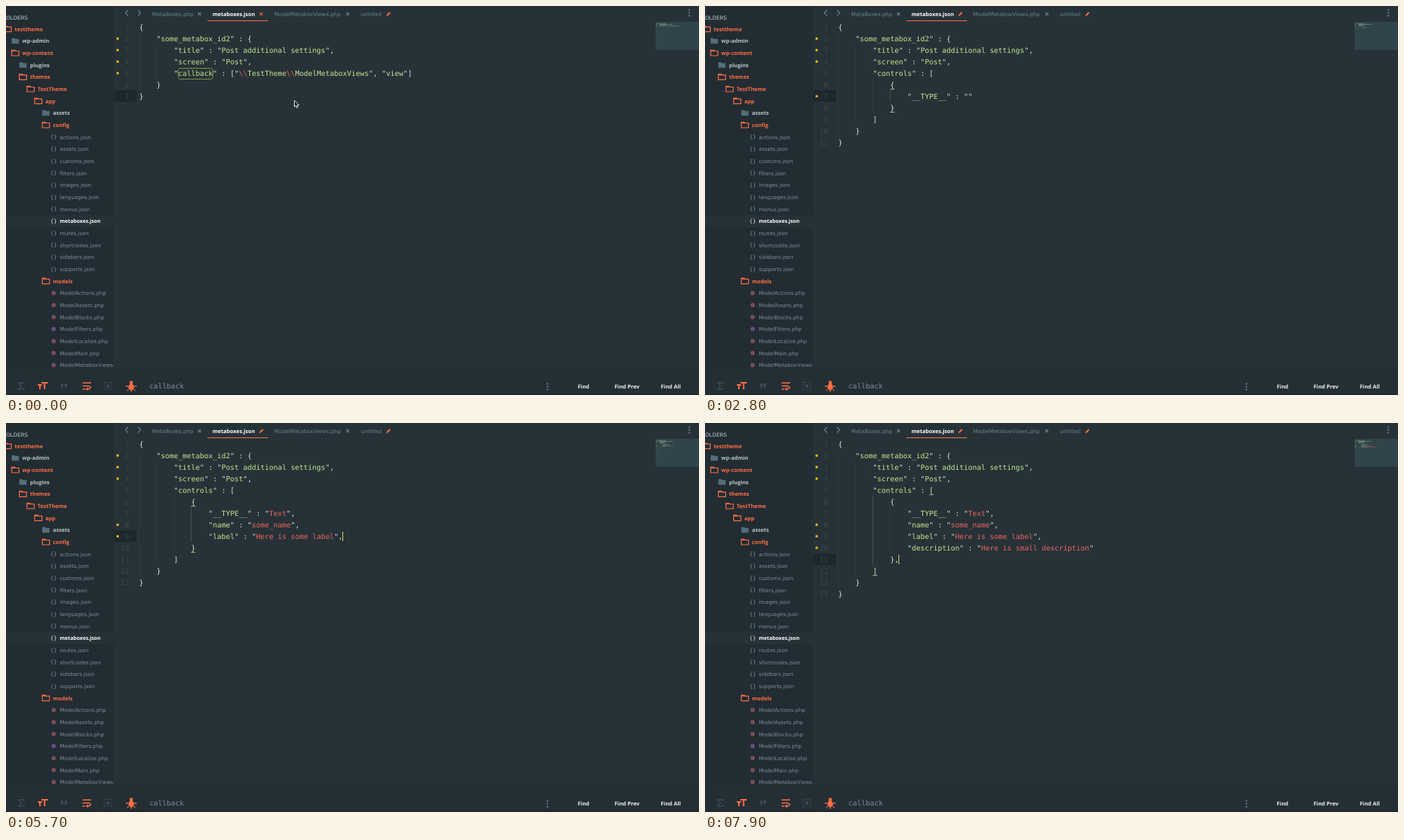
These frames come from a looping animation (960 px wide and 540 px high, 8000 ms). An HTML page with a canvas:

```html
<!DOCTYPE html>
<html lang="en">
<head>
<meta charset="utf-8">
<title>Code editor</title>
<style>
html, body { margin: 0; width: 100%; height: 100%; overflow: hidden; background: #263238; }
canvas { display: block; width: 960px; height: 540px; }
</style>
</head>
<body>
<canvas id="stage" width="960" height="540"></canvas>
<script>
const ctx = document.getElementById('stage').getContext('2d');
ctx.textRendering = 'geometricPrecision';
const LOOP = 8000, X0 = 184.5, CHAR = 6, ROW = 16;
const MONO = '9.967px "DejaVu Sans Mono", monospace';
const UI = '7.25px "DejaVu Sans", sans-serif';
const TAB = '7.45px "DejaVu Sans", sans-serif';
const BOLD = 'bold 7.5px "Open Sans", sans-serif';
const BOLD_FILE = 'bold 7.2px "Open Sans", sans-serif';
const C = {
  bg: '#263238', side: '#222c33', dark: '#1d272d', orange: '#ff6e43', grey: '#688490', file: '#78909c',
  dim: '#37464d', green: '#c3e88d', red: '#ee655a', pale: '#d6e4d6', yellow: '#ffc414'
};

// ---- drawing helpers ----
function rect(x, y, w, h, color) {
  ctx.fillStyle = color;
  ctx.fillRect(x, y, w, h);
}
function text(s, x, y, font, color, align = 'left') {
  ctx.font = font;
  ctx.fillStyle = color;
  ctx.textAlign = align;
  ctx.fillText(s, x, y);
}
function dot(x, y, r, color) {
  ctx.fillStyle = color;
  ctx.beginPath();
  ctx.arc(x, y, r, 0, 7);
  ctx.fill();
}
function line(points, color, width = 1) {
  ctx.strokeStyle = color;
  ctx.lineWidth = width;
  ctx.beginPath();
  points.forEach(([x, y], i) => i ? ctx.lineTo(x, y) : ctx.moveTo(x, y));
  ctx.stroke();
}
function cross(x, y, color) {
  line([[x - 2, y - 2], [x + 2, y + 2]], color, 1.1);
  line([[x - 2, y + 2], [x + 2, y - 2]], color, 1.1);
}
function pencil(x, y) {
  line([[x - 2, y + 2], [x + 2, y - 2]], C.orange, 2.2);
  line([[x - 3.2, y + 3.2], [x - 2, y + 2]], C.orange, 1);
}
const colX = c => X0 + c * CHAR;
const indentOf = s => s.search(/\S|$/);

// ---- a tiny editor with auto-pairing ----
const START = [
  '{',
  '    "some_metabox_id2" : {',
  '        "title" : "Post additional settings",',
  '        "screen" : "Post",',
  String.raw`        "callback" : ["\\TestTheme\\ModelMetaboxViews", "view"]`,
  '    }',
  '}'
];
const PAIRS = { '"': '"', '[': ']', '{': '}' };

class Doc {
  constructor() {
    this.lines = START.slice();
    this.row = 6;
    this.col = 1;
    this.last = -600;
    this.dirty = false;
  }
  go(row) {
    this.row = row;
    this.col = this.lines[row].length;
  }
  clear() {
    this.col = indentOf(this.lines[this.row]);
    this.lines[this.row] = ' '.repeat(this.col);
    this.dirty = true;
  }
  key(k) {
    const s = this.lines[this.row];
    const head = s.slice(0, this.col), tail = s.slice(this.col);
    if (k === '\n') {
      const pad = ' '.repeat(indentOf(s));
      const open = /[\[{]$/.test(head) && /^[\]}]/.test(tail);
      const rows = open ? [head, pad + '    ', pad + tail] : [head, pad + tail];
      this.lines.splice(this.row, 1, ...rows);
      this.row++;
      this.col = indentOf(rows[1]);
      return;
    }
    if (!(k === '"' && tail[0] === '"')) {
      this.lines[this.row] = head + k + (PAIRS[k] || '') + tail;
    }
    this.col++;
  }
}

// start time, time per key, keys or an action
const SCRIPT = [
  [250, 0, d => d.go(4)],
  [380, 0, d => d.clear()],
  [450, 60, '"controls" : [\n'],
  [1560, 45, '{\n"__TYPE__" : "'],
  [2850, 30, 'Text",\n"name" : "'],
  [3950, 38, 'some_name",\n"label" : "Here is some label",'],
  [5750, 27, '\n"description" : "Here is small descript'],
  [6940, 70, 'ion'],
  [7400, 0, d => d.go(10)],
  [7650, 0, ',']
];

function docAt(t) {
  const doc = new Doc();
  for (const [start, gap, keys] of SCRIPT) {
    const steps = typeof keys === 'string' ? [...keys] : [keys];
    steps.forEach((k, i) => {
      const at = start + i * gap;
      if (at > t) return;
      typeof k === 'string' ? doc.key(k) : k(doc);
      doc.last = at;
    });
  }
  return doc;
}

// Innermost brackets around the caret
function enclosing(doc) {
  const stack = [];
  for (let r = 0; r < doc.lines.length; r++) {
    for (let c = 0; c < doc.lines[r].length; c++) {
      const ch = doc.lines[r][c];
      if ('[{'.includes(ch)) stack.push([r, c]);
      else if (']}'.includes(ch)) {
        const open = stack.pop();
        const before = open[0] < doc.row || (open[0] === doc.row && open[1] < doc.col);
        const after = r > doc.row || (r === doc.row && c >= doc.col);
        if (before && after) return [open, [r, c]];
      }
    }
  }
  return [];
}

// Runs of equally coloured characters
function runs(s) {
  const out = [];
  let inside = false;
  const deep = indentOf(s) >= 16, colon = s.indexOf(' : ');
  [...s].forEach((ch, c) => {
    let color = C.pale;
    if (ch === '"') inside = !inside;
    else if (inside) color = ch === '\\' || (deep && colon > 0 && c > colon) ? C.red : C.green;
    const prev = out[out.length - 1];
    if (prev && prev.color === color) prev.s += ch;
    else out.push({ s: ch, c, color });
  });
  return out;
}

const FLAGGED = /some_meta|title|screen|callback|name|label|descr/;
const flagged = (doc, r) => FLAGGED.test(doc.lines[r]) ||
  (r === doc.row && !/^\s*[\]{}]/.test(doc.lines[r]));

function guides(doc) {
  const ind = doc.lines.map((s, i) => s.trim() ? indentOf(s) : indentOf(doc.lines[i + 1] || ''));
  doc.lines.forEach((s, r) => {
    for (let c = 0; c < indentOf(s); c += 4) {
      for (let y = 0; y < ROW; y += 2) rect(Math.floor(colX(c)), 21 + r * ROW + y, 1, 1, '#33434a');
    }
  });
  const col = ind[doc.row] - 4;
  if (col < 0) return;
  let a = doc.row, b = doc.row;
  while (ind[a - 1] > col) a--;
  while (ind[b + 1] > col) b++;
  rect(Math.floor(colX(col)), 21 + a * ROW, 1, (b - a + 1) * ROW, '#3d4f57');
}

function popup(doc) {
  const head = doc.lines[doc.row].slice(0, doc.col);
  const word = (head.match(/\w+$/) || [''])[0];
  if (word.length < 2) return;
  const words = doc.lines.map((s, r) => r === doc.row
    ? head.slice(0, -word.length) + ' ' + s.slice(doc.col) : s).join(' ').match(/\w+/g) || [];
  const hits = [...new Set(words)].filter(w => w.startsWith(word) && w !== word);
  const x = colX(doc.col - word.length), y = 39 + doc.row * ROW;
  hits.forEach((w, i) => {
    const top = y + i * 21;
    rect(Math.round(x - 9.5), top, 200, 21, i ? '#34454e' : '#4f6471');
    text(w, x, top + 14, MONO, '#e3eaec');
    text(word, x, top + 14, MONO, '#71c9d8');
  });
}

function minimap(doc) {
  rect(900, 22, 60, 39, '#30444b');
  ctx.globalAlpha = 0.45;
  doc.lines.forEach((s, r) => {
    const y = 23 + r * 1.1;
    for (const run of runs(s)) {
      const lead = indentOf(run.s);
      if (lead < run.s.length) {
        rect(901 + (run.c + lead) * 0.5, y, (run.s.length - lead) * 0.5, 0.7, run.color);
      }
    }
    if (flagged(doc, r)) rect(900.5, y, 1, 1.1, C.yellow);
  });
  ctx.globalAlpha = 1;
}

function code(doc, t) {
  rect(150, 21 + doc.row * ROW, 31, 16, C.dark);
  guides(doc);
  doc.lines.forEach((s, r) => {
    const y = 32.5 + r * ROW;
    text(r + 1, 170.5, y, MONO, C.dim, 'right');
    if (flagged(doc, r)) rect(153.2, y - 4.8, 3, 3, C.yellow);
    for (const run of runs(s)) text(run.s, colX(run.c), y, MONO, run.color);
    const hit = s.indexOf('callback');
    if (hit >= 0) {
      ctx.strokeStyle = '#cbd04e';
      ctx.lineWidth = 1;
      ctx.setLineDash([1.5, 1]);
      ctx.beginPath();
      ctx.roundRect(Math.floor(colX(hit)) + 0.5, y - 10, 48, 15, 3);
      ctx.stroke();
      ctx.setLineDash([]);
    }
  });
  for (const [r, c] of enclosing(doc)) rect(colX(c), 35 + r * ROW, CHAR, 1, '#a3b86f');
  if ((t - doc.last) % 1000 < 500) {
    rect(Math.floor(colX(doc.col)), 23 + doc.row * ROW, 1, 13, '#dcd75c');
  }
  popup(doc);
}

// ---- side bar ----
const FILES = 'actions assets customs filters images languages menus metaboxes routes shortcodes sidebars supports'.split(' ');
const MODELS = 'Actions Assets Blocks Filters Localize Main MetaboxViews'.split(' ');
const folder = (name, depth, open) => ({ name, depth, open, kind: 'dir' });
const TREE = [
  folder('testtheme', 0, true), folder('wp-admin', 1), folder('wp-content', 1, true),
  folder('plugins', 2), folder('themes', 2, true), folder('TestTheme', 3, true),
  folder('app', 4, true), folder('assets', 5), folder('config', 5, true),
  ...FILES.map(n => ({ name: n + '.json', kind: 'json' })),
  folder('models', 5, true),
  ...MODELS.map(n => ({ name: 'Model' + n + '.php', kind: 'php' }))
];

function folderIcon(x, y, open) {
  ctx.beginPath();
  ctx.moveTo(x, y - 4);
  ctx.lineTo(x + 4, y - 4);
  ctx.lineTo(x + 5.2, y - 2.8);
  ctx.lineTo(x + 10, y - 2.8);
  ctx.lineTo(x + 10, y + 3.7);
  ctx.lineTo(x, y + 3.7);
  ctx.closePath();
  if (open) {
    ctx.strokeStyle = C.orange;
    ctx.lineWidth = 1.2;
    ctx.stroke();
    rect(x, y - 4, 5, 1.6, C.orange);
  } else {
    ctx.fillStyle = '#546e7a';
    ctx.fill();
  }
}

function sidebar() {
  ctx.save();
  ctx.beginPath();
  ctx.rect(0, 0, 149.5, 503);
  ctx.clip();
  rect(0, 0, 149.5, 503, C.side);
  text('OLDERS', 0, 19, TAB, '#c3ccd0');
  TREE.forEach((item, i) => {
    const y = 32 + i * 16.66, base = y + 2.8;
    if (item.kind === 'dir') {
      const x = 12 + item.depth * 10.6;
      folderIcon(x - 14.7, y, item.open);
      text(item.name, x, base, BOLD, item.open ? C.orange : '#b9c5ca');
      return;
    }
    const active = item.name === 'metaboxes.json';
    if (active) rect(0, y - 8.3, 149.5, 16.6, C.bg);
    if (item.kind === 'json') {
      const color = active ? '#e8eef0' : '#7d97a3';
      text('{', 61.5, base - 0.3, UI, color);
      text('}', 66, base - 0.3, UI, color);
    } else {
      dot(66, y, 3, item.name.includes('Filters') ? '#694b86' : '#7b4d58');
    }
    text(item.name, 74.5, base, active ? BOLD_FILE : UI, active ? '#ffffff' : C.file);
  });
  ctx.restore();
}

// ---- tabs and find panel ----
function dots(x, y) {
  for (let i = -1; i <= 1; i++) dot(x, y + i * 4, 1.2, '#60757f');
}

function tabs(dirty) {
  line([[169, 5.5], [165.5, 9.5], [169, 13.5]], '#667e8a', 1.2);
  line([[183, 5.5], [186.5, 9.5], [183, 13.5]], '#667e8a', 1.2);
  text('MetaBoxes.php', 202.5, 13.7, TAB, C.grey);
  cross(268, 11, C.grey);
  text('metaboxes.json', 286, 13.7, BOLD, '#ffffff');
  dirty ? pencil(354, 11) : cross(353.5, 11, '#f0593f');
  rect(279, 20, 84, 1, C.orange);
  text('ModelMetaboxViews.php', 371.5, 13.7, TAB, C.grey);
  cross(473.5, 11, C.grey);
  text('untitled', 491.5, 13.7, TAB, C.grey);
  pencil(530, 11);
  dots(946.5, 9.5);
}

function findPanel() {
  const off = '#3c4c54';
  rect(0, 503, 960, 37, '#232e35');
  rect(0, 538, 960, 2, '#1f292f');
  line([[25, 525], [25, 523], [17.5, 523], [21.5, 527.5], [17.5, 532], [25, 532], [25, 530]], off, 1.4);
  rect(44, 525, 6, 2, C.orange);
  rect(46, 525, 2, 7, C.orange);
  rect(49, 522, 9, 2, C.orange);
  rect(52.5, 522, 2, 10, C.orange);
  for (const x of [76, 81]) {
    rect(x, 524, 3.5, 4, off);
    line([[x + 3, 527], [x + 1, 531]], off, 1.5);
  }
  rect(106, 522.5, 12, 1.5, C.orange);
  rect(106, 531, 4, 1.5, C.orange);
  line([[106, 527.5], [115, 527.5], [117.5, 529.5], [115, 531.7], [112, 531.7]], C.orange, 1.4);
  line([[113.5, 529.7], [111.5, 531.7], [113.5, 533.7]], C.orange, 1.2);
  ctx.setLineDash([2, 1.2]);
  line([[136, 522.5], [146, 522.5], [146, 532.5], [136, 532.5], [136, 522.5]], off, 1.2);
  ctx.setLineDash([]);
  rect(139, 525.5, 4, 4, off);
  dot(173.5, 529, 4, C.orange);
  rect(171.5, 520.5, 4, 6, C.orange);
  rect(166, 527, 3, 1.5, C.orange);
  rect(178, 527, 3, 1.5, C.orange);
  rect(172.7, 533, 1.6, 2.5, C.orange);
  line([[169.5, 532.5], [168, 534]], C.orange, 1.2);
  line([[177.5, 532.5], [179, 534]], C.orange, 1.2);
  text('callback', 198.5, 531.3, MONO, '#78909a');
  dots(750, 528.5);
  [['Find', 792], ['Find Prev', 843], ['Find All', 907]].forEach(([s, x]) => text(s, x, 530.7, BOLD, '#eef2f3'));
}

function pointer(x, y) {
  ctx.beginPath();
  [[0, 0], [0, 9], [2.1, 7.2], [3.5, 10.3], [5, 9.6], [3.7, 6.6], [6.4, 6.5]].forEach(([a, b], i) =>
    i ? ctx.lineTo(x + a, y + b) : ctx.moveTo(x + a, y + b));
  ctx.closePath();
  ctx.fillStyle = '#11171a';
  ctx.fill();
  ctx.strokeStyle = '#e9eef0';
  ctx.lineWidth = 1;
  ctx.stroke();
}

function draw(now) {
  const t = now % LOOP, doc = docAt(t);
  rect(0, 0, 960, 540, C.bg);
  sidebar();
  tabs(doc.dirty);
  code(doc, t);
  minimap(doc);
  findPanel();
  if (t < 380) pointer(399.5, 131);
  requestAnimationFrame(draw);
}
requestAnimationFrame(draw);
</script>
</body>
</html>
```
